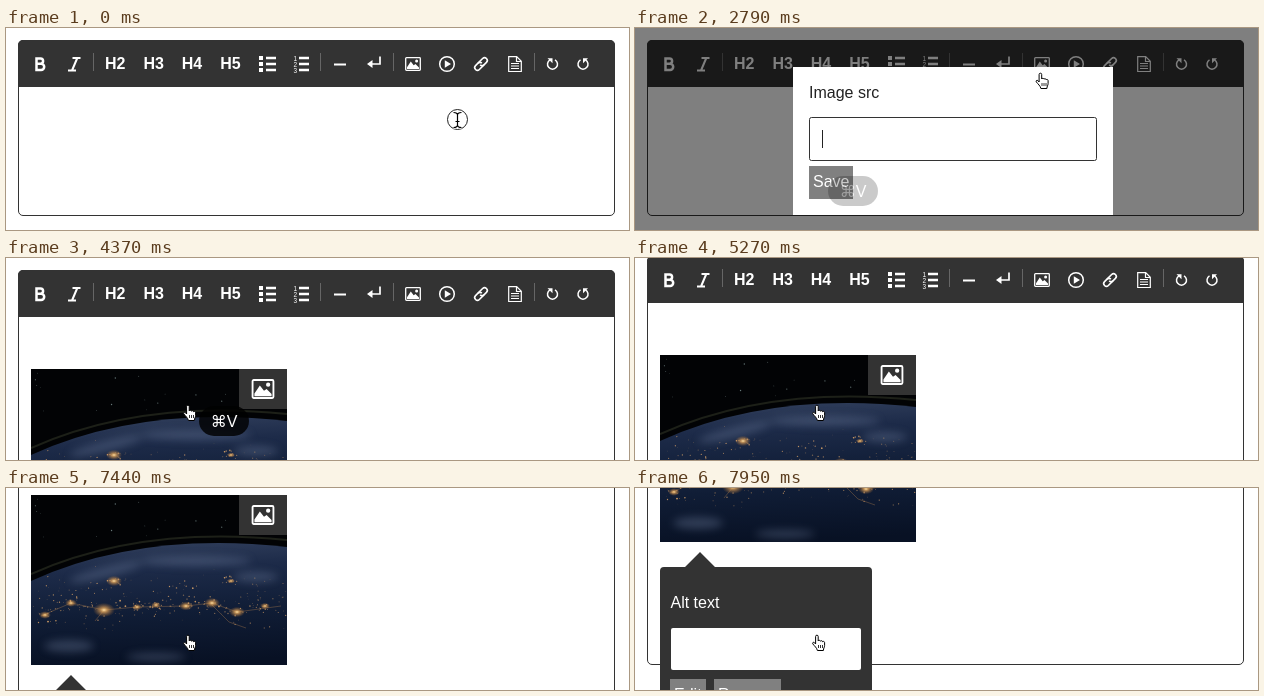
These frames come from a looping animation (623 by 202 pixels, 8 s). An HTML page:

```html
<!DOCTYPE html>
<html lang="en">
<head>
<meta charset="utf-8">
<title>Editor image demo</title>
<style>
  html, body { margin: 0; width: 100%; height: 100%; overflow: hidden; background: #fff; }
  svg { display: block; width: 100vw; height: 100vh; }
  text { font: 16px "Liberation Sans", "DejaVu Sans", sans-serif; }
  .b { font-weight: bold; }
  .line { fill: none; stroke: #fff; }
</style>
</head>
<body>
<svg viewBox="0 0 623 202">
  <defs>
    <symbol id="pic" viewBox="0 0 16 14">
      <rect class="line" x=".7" y=".7" width="14.6" height="12.6" rx=".8" stroke-width="1.3"/>
      <path d="M2 12V10.200L5.800 4.500 8.700 8.300 10.500 7 14 10.500V12z" fill="#fff"/>
      <circle cx="11.600" cy="4" r="1.500" fill="#fff"/>
    </symbol>
    <linearGradient id="ground" x1=".3" y1="0" x2=".4" y2="1">
      <stop offset="0" stop-color="#33415e"/>
      <stop offset=".25" stop-color="#1d2b49"/>
      <stop offset=".6" stop-color="#101d36"/>
      <stop offset="1" stop-color="#081124"/>
    </linearGradient>
    <radialGradient id="glow">
      <stop offset="0" stop-color="#ffe2a6"/>
      <stop offset=".3" stop-color="#e6a75a" stop-opacity=".75"/>
      <stop offset="1" stop-color="#a86a30" stop-opacity="0"/>
    </radialGradient>
    <filter id="soft" x="-50%" y="-50%" width="200%" height="200%"><feGaussianBlur stdDeviation="4"/></filter>
    <clipPath id="frame"><path d="M0 0H256V170H0z"/></clipPath>
    <clipPath id="globe"><path d="M0 86Q110 36 256 52V170H0z"/></clipPath>
  </defs>

  <g id="page">
    <rect id="box" x="12.500" y="12.500" width="596" height="175" rx="4.500" fill="#fff" stroke="#333"/>
    <path d="M12 59V17a5 5 0 0 1 5-5H604a5 5 0 0 1 5 5V59z" fill="#333"/>
    <path d="M87.500 25v18M314.500 25v18M387.500 25v18M528.500 25v18" stroke="#666"/>
    <g class="line" stroke-width="2">
      <path d="M30.500 30.500h4a2.600 2.600 0 0 1 0 5.200h-4zM30.500 35.700h4.600a3.100 3.100 0 0 1 0 6.200h-4.600z" stroke-width="2.500"/>
      <path d="M66.500 30h8M62 42.500h8M71.300 30L66 42.500"/>
      <path d="M253 30h4M253 36h4M253 42h4" stroke-width="4"/>
      <path d="M260 30h10M260 36h10M260 42h10M293 30h10M293 36h10M293 42h10" stroke-width="2.500"/>
      <path d="M328 36.500h12"/>
      <path d="M374 28.500V36h-9" stroke-width="1.700"/>
      <circle cx="441" cy="36" r="7.300" stroke-width="1.500"/>
      <g transform="translate(475 36) rotate(-45)" stroke-width="1.600">
        <path d="M1.500 2.700H-5a2.700 2.700 0 0 1 0-5.400h3.500a2.700 2.700 0 0 1 2.700 2.700"/>
        <path d="M-1.500 -2.700H5a2.700 2.700 0 0 1 0 5.400h-3.500a2.700 2.700 0 0 1-2.700-2.700"/>
      </g>
      <path d="M502.700 28.700h8l4.600 4.600v10.200h-12.600zM510.500 29v4.500h4.500M505 35.500h8M505 38h8M505 40.500h8" stroke-width="1.200"/>
      <path d="M544 31.800a5 5 0 1 0 5 0M579.500 31.800a5 5 0 1 1 -5 0" stroke-width="1.500"/>
    </g>
    <path d="M361 36l5.500-4v8zM438.800 32.300v7.400l6.200-3.700zM541.500 30.200h5v5zM582 30.200h-5v5z" fill="#fff"/>
    <use href="#pic" x="399" y="29" width="16" height="14"/>
    <g id="labels" fill="#fff"></g>
    <path id="caret" d="M25.500 82v18" stroke="#222"/>

    <g id="figure">
      <g transform="translate(25 111)" clip-path="url(#frame)">
        <rect width="256" height="170" fill="#020305"/>
        <path d="M0 79Q110 30 256 45" fill="none" stroke="#1d2018" stroke-width="2"/>
        <g clip-path="url(#globe)">
          <rect y="44" width="256" height="126" fill="url(#ground)"/>
          <g filter="url(#soft)" fill="#7888a8" opacity=".35">
            <ellipse cx="75" cy="77" rx="38" ry="5" transform="rotate(-14 75 77)"/>
            <ellipse cx="165" cy="66" rx="55" ry="5"/>
            <ellipse cx="38" cy="151" rx="25" ry="6"/>
            <ellipse cx="225" cy="82" rx="22" ry="5"/>
            <ellipse cx="125" cy="162" rx="30" ry="4"/>
          </g>
          <g id="lights"></g>
        </g>
        <g id="stars" fill="#677"></g>
      </g>
      <path d="M233 111h48v40h-48z" fill="#333"/>
      <use href="#pic" x="245" y="121" width="24" height="20"/>
      <path d="M50 306l15-15 15 15H233a4 4 0 0 1 4 4V450H25V310a4 4 0 0 1 4-4z" fill="#333"/>
      <rect x="36" y="367" width="190" height="42" rx="2" fill="#fff"/>
      <path d="M35 418h36v33h-36zM79 418h67v33h-67z" fill="gray"/>
      <g fill="#fff">
        <text x="35.500" y="347">Alt text</text>
        <text x="39" y="439">Edit</text>
        <text x="83" y="439">Remove</text>
      </g>
    </g>
  </g>

  <g id="tip">
    <rect x="373" y="59" width="68" height="30" rx="4" fill="#222"/>
    <text class="b" x="407" y="79.500" fill="#fff" text-anchor="middle" style="font-size:15px">Image</text>
  </g>

  <g id="modal">
    <rect width="623" height="202" opacity=".5"/>
    <path d="M158 39h320v148h-320z" fill="#fff"/>
    <rect x="174.500" y="89.500" width="287" height="43" rx="2" fill="#fff" stroke="#333"/>
    <path d="M174 138h44v33h-44z" fill="gray"/>
    <text x="174" y="70" fill="#222">Image src</text>
    <text x="178" y="159" fill="#fff">Save</text>
    <g id="pasted">
      <text x="187" y="116" fill="#222">../static/example-lowres-image.jpg</text>
      <path d="M243 118.500H429" stroke="#e8443c" stroke-width="2" stroke-linecap="round" stroke-dasharray="0 3"/>
    </g>
    <path id="caret2" d="M.5 102v18" stroke="#222"/>
  </g>

  <g id="keys">
    <rect x="193" y="148" width="50" height="30" rx="15" opacity=".82"/>
    <text x="218" y="169" fill="#fff" text-anchor="middle">⌘V</text>
  </g>

  <g id="cursor">
    <circle id="click" r="10" fill="#fff" fill-opacity=".3" stroke="#222"/>
    <g id="beam" fill="none">
      <path d="M-4-7q4 0 4 2.500V5.500M4-7q-4 0-4 2.500M-4 8q4 0 4-2.500q0 2.500 4 2.500M-2 2h4" stroke="#fff" stroke-width="2.600"/>
      <path d="M-4-7q4 0 4 2.500V5.500M4-7q-4 0-4 2.500M-4 8q4 0 4-2.500q0 2.500 4 2.500M-2 2h4" stroke="#000" stroke-width="1.200"/>
    </g>
    <path id="arrow" d="M0 0v13l3-3 2 4.500 2-1-2-4.300h4z" stroke="#fff"/>
    <g id="hand" transform="translate(-6.500 2.500)" stroke="#000" stroke-linejoin="round">
      <path d="M3.600 9.500V2a1.300 1.300 0 0 1 2.600 0V6.500c.3-1 2.200-.9 2.300.2.500-.9 2-.6 2.100.5.600-.6 2-.3 2 .9V11c0 2-1.200 2.600-1.200 5H5.400C5 13.500 2.400 11.500.8 9.400.1 8.200 1.400 7.300 2.400 8.100z" fill="#fff"/>
      <path d="M6.500 10.500v3M8.500 10.500v3M10.500 10.500v3" stroke-width=".8"/>
    </g>
  </g>
</svg>
<script>
const LOOP = 8000;
const $ = id => document.getElementById(id);
const set = (id, name, value) => $(id).setAttribute(name, value);
const show = (id, on) => set(id, "opacity", +on);
const within = (t, a, b) => t >= a && t < b;
const mix = (a, b, p) => a + (b - a) * p;

// Progress in n equal jumps: the first at time a, the last at time b.
function steps(t, a, b, n) {
  if (t < a) return 0;
  return Math.min(n, Math.floor((t - a) / (b - a) * (n - 1) + 1e-6) + 1) / n;
}
const smooth = p => p * p * (3 - 2 * p);
const glide = p => p + p * p - p * p * p;

let seed = 11;
function rand() {
  seed = (seed * 16807) % 2147483647;
  return seed / 2147483647;
}
const spread = () => rand() + rand() + rand() - 1.5;

function drawLabels() {
  let out = [2, 3, 4, 5].map((n, i) =>
    `<text class="b" x="${99 + i * 38.4}" y="41">H${n}</text>`).join("");
  for (let n = 1; n < 4; n++)
    out += `<text x="287.500" y="${26.500 + n * 6}" style="font-size:6.500px">${n}</text>`;
  $("labels").innerHTML = out;
}

function drawLights() {
  const cities = [[73, 115, 11], [83, 86, 8], [155, 111, 7], [181, 108, 8], [206, 117, 8],
    [106, 112, 5], [125, 110, 5], [40, 108, 6], [14, 120, 6], [234, 111, 5], [200, 86, 4]];
  const dot = (x, y, r, a) =>
    `<circle cx="${x.toFixed(1)}" cy="${y.toFixed(1)}" r="${r.toFixed(2)}" fill="#dca468" opacity="${a.toFixed(2)}"/>`;
  let out = `<path d="M10 121L40 108 73 115 106 112 155 111 181 108 206 117 250 111M181 110L198 127 215 133M73 115L64 126"
    fill="none" stroke="#b9854e" stroke-width=".7" opacity=".5"/>`;
  for (const [x, y, r] of cities) {
    out += `<ellipse cx="${x}" cy="${y}" rx="${r}" ry="${r * .65}" fill="url(#glow)"/>`;
    for (let i = 0; i < 12; i++)
      out += dot(x + spread() * r * 2, y + spread() * r * 1.4, .3 + rand() * .6, .5 + rand() * .5);
  }
  for (let i = 0; i < 170; i++)
    out += dot(rand() * 256, 106 + spread() * 26, .25 + rand() * .5, .25 + rand() * .6);
  $("lights").innerHTML = out;

  let stars = "";
  for (let i = 0; i < 16; i++)
    stars += `<circle cx="${rand() * 205}" cy="${rand() * 44}" r="${.3 + rand() * .4}"/>`;
  $("stars").innerHTML = stars;
}

function pointer(t) {
  const a = smooth(steps(t, 480, 1060, 10));
  const b = smooth(steps(t, 3040, 3540, 9));
  const c = steps(t, 3600, 3940, 7);
  const at = (p0, p1, p2, p3) => mix(mix(mix(p0, p1, a), p2, b), p3, c);
  return [at(451.5, 407, 211.5, 183.5), at(91.5, 42, 148.7, 144)];
}

function shape(t, y) {
  if (t < 2000) return y > 59 ? "beam" : "hand";
  if (t < 3040 || y > 138) return "hand";
  return within(y, 89, 133) ? "beam" : "arrow";
}

function render(t) {
  const inserted = t >= 4280;
  const scroll = 89 * glide(steps(t, 5210, 5590, 7)) + 138 * glide(steps(t, 7440, 7950, 10));
  set("page", "transform", `translate(0 ${-Math.round(scroll)})`);
  set("box", "height", inserted ? 391 : 175);
  show("figure", inserted);
  show("caret", within(t, 300, 800) || within(t, 1300, 1800));

  set("tip", "opacity", t < 2430 ? steps(t, 1770, 1950, 4) : 0);
  set("modal", "opacity", steps(t, 2310, 2430, 3) - steps(t, 4280, 4370, 2));
  const pasted = t >= 3020;
  show("pasted", pasted);
  show("caret2", within(t, 2310, 2810) || within(t, 3020, 3520) || t >= 4010);
  set("caret2", "transform", `translate(${pasted ? 429 : 187} 0)`);
  set("keys", "opacity", t < 5210 ? steps(t, 2790, 2960, 4) : 0);

  const [x, y] = pointer(t);
  const kind = shape(t, y);
  set("cursor", "transform", `translate(${x} ${y})`);
  for (const id of ["beam", "arrow", "hand"]) show(id, id === kind);
  show("click", t < 60 || within(t, 2250, 2310) || within(t, 4190, 4280) || within(t, 6670, 6720));
}

drawLabels();
drawLights();
const start = performance.now();
function tick() {
  render((performance.now() - start) % LOOP);
  requestAnimationFrame(tick);
}
render(0);
requestAnimationFrame(tick);
</script>
</body>
</html>
```
